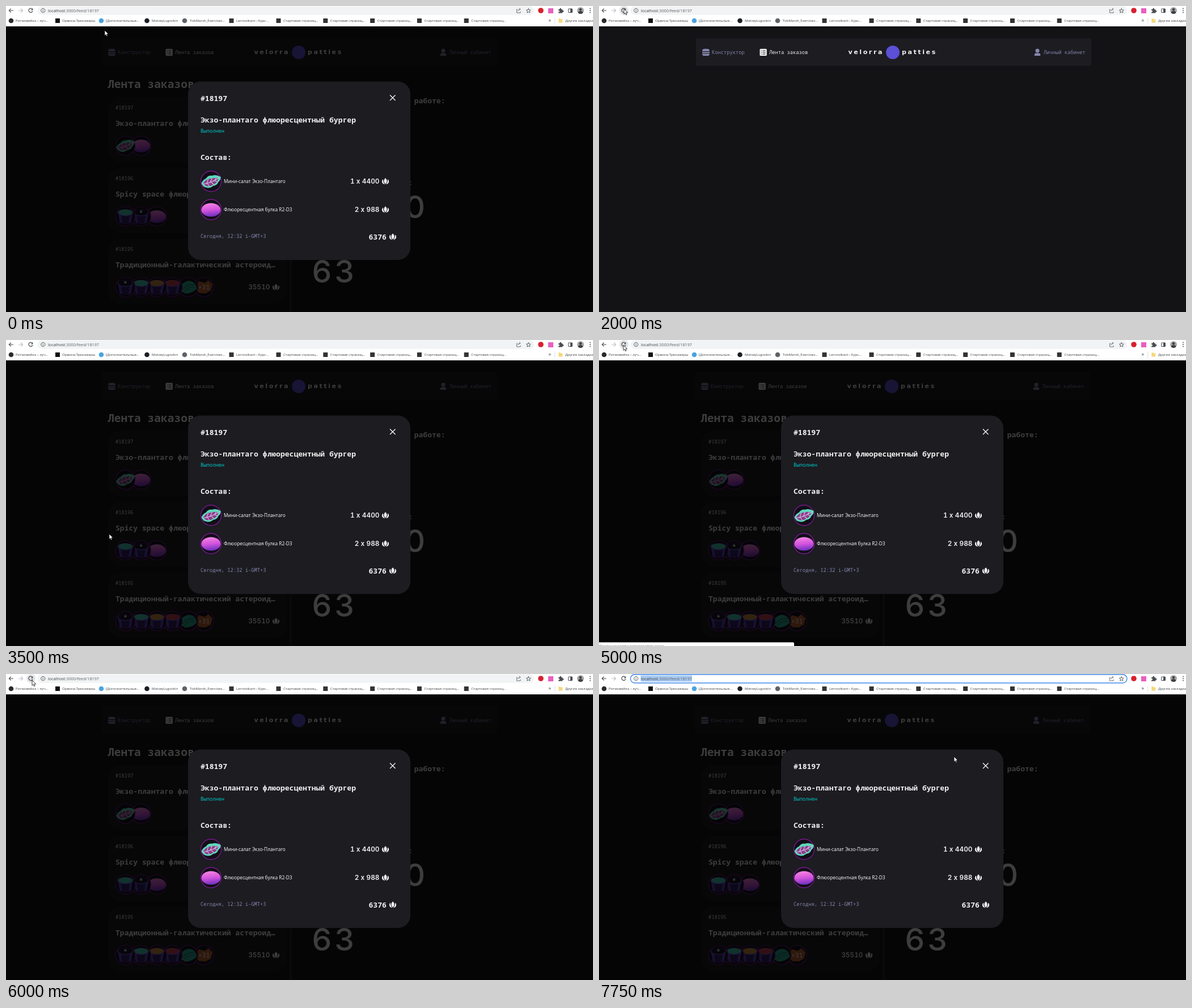
These frames come from a looping animation (1035 by 541 pixels, 8 s). An HTML page:

```html
<!DOCTYPE html>
<html lang="ru">
<head>
<meta charset="utf-8">
<title>Лента заказов</title>
<style>
  html, body { margin: 0; width: 100%; height: 100%; overflow: hidden; background: #131316; }
  svg { display: block; width: 1035px; height: 541px; }
  text { white-space: pre; }
  .ui { font: 6.15px "Open Sans", "Noto Sans", sans-serif; fill: #3c4043; }
  .url { font-size: 7.25px; }
  .mono { font-family: "Noto Sans Mono", "DejaVu Sans Mono", monospace; fill: #f2f2f3; }
  .s { font-size: 8.75px; }
  .m { font-size: 13.05px; font-weight: 600; }
  .l { font-size: 19.6px; font-weight: 600; }
  .muted { fill: #8585ad; }
  .item { font: 8.3px "Open Sans", "Noto Sans", sans-serif; fill: #fff; }
  .num { font: 600 11.7px Inter, sans-serif; font-variant-numeric: tabular-nums; letter-spacing: .1px; fill: #f2f2f3; text-anchor: end; }
  .big { font: 500 55px Inter, sans-serif; letter-spacing: 5px; fill: #f2f2f3; }
  .brand { font: bold 11px "DejaVu Sans", sans-serif; letter-spacing: 2.6px; fill: #f2f2f3; }
</style>
</head>
<body>
<svg id="stage" viewBox="0 0 1035 541" xmlns="http://www.w3.org/2000/svg"></svg>
<script>
const text = (x, y, cls, str, extra = '') => `<text x="${x}" y="${y}" class="${cls}" ${extra}>${str}</text>`;
const rect = (x, y, w, h, fill, r = 0, extra = '') =>
  `<rect x="${x}" y="${y}" width="${w}" height="${h}" rx="${r}" fill="${fill}" ${extra}/>`;
const dot = (x, y, r, fill, extra = '') => `<circle cx="${x}" cy="${y}" r="${r}" fill="${fill}" ${extra}/>`;
const line = (d, color, w = 1.2, extra = '') => `<path d="${d}" fill="none" stroke="${color}" stroke-width="${w}" ${extra}/>`;
const shape = (d, fill, extra = '') => `<path d="${d}" fill="${fill}" ${extra}/>`;
const at = (x, y, body, scale = 1) => `<g transform="translate(${x} ${y}) scale(${scale})">${body}</g>`;

const DARK = '#4a4d51';

// Ingredient pictures, drawn inside a circle of radius 18
const cup = top =>
  shape('M-14-7L-10.5 12Q0 17 10.5 12L14-7Z', '#5b3fc0') +
  shape('M-8-2L-6 14Q0 15.5 6 14L8-2Z', '#2f2068') +
  `<ellipse cy="-7" rx="14.5" ry="6.5" fill="#6a4fd0"/><ellipse cy="-7.6" rx="13" ry="5.6" fill="${top}"/>`;

const pictures = {
  leaf: shape('M-17 3Q-13-4-9-5Q-5-11 2-10Q8-13 17-8Q18-3 13 1Q11 7 4 8Q-2 13-8 11Q-15 10-17 3Z', '#5fd6bc') +
    shape('M-14 4Q-9-5 0-5Q7-7 13-5Q11 3 4 6Q-3 10-9 8Z', '#8c3d8c') +
    line('M-15 5Q0 3 14-6M-8 5L-5-4M-2 3L2-6M5 0L9-6M-6 4L-3 9M1 2L5 6M7-1L11 1', '#d3bfdc', 1.1),
  bun: '<ellipse cy=".5" rx="17" ry="12" fill="url(#bun)"/>',
  sauce: cup('#17131f') + dot(0, -9, 2.4, '#b9c0d8'),
  mint: cup('#45c6ae'),
  gold: cup('#c98a3a'),
  berry: cup('#c2404e'),
  teal: shape('M-16 6Q-14-10 2-12Q15-10 16 3Q6 13-6 12Z', '#2ba88f') +
    line('M-11 5Q0-7 12-4M-7 8Q2-2 13 1', '#176a62', 1.2),
  crust: shape('M-16 3L-10-11 2-8 8-13 16-5 13 7 3 12-9 11Z', '#b8602f') +
    text(0, 4, 'mono', '+31', 'font-size="12" text-anchor="middle"'),
};

const food = (kind, x, y, r = 17) => at(x, y,
  dot(0, 0, 18, '#100f16', 'stroke="#7c1690" stroke-width="1.3"') + pictures[kind], r / 18);

const side = 'M-3.9-3.4C-7.4-1.6-7 4.8-.8 5.4C-3.5 2.6-4.3-.2-3.9-3.4Z';
const gem = (x, y) => at(x, y,
  shape('M0-5.8C3.8-2.4 3.2 1.6 0 4.6C-3.2 1.6-3.8-2.4 0-5.8Z', '#f2f2f3') +
  shape(side, '#f2f2f3') + shape(side, '#f2f2f3', 'transform="scale(-1 1)"'));

const foods = (y, kinds) => kinds.map((k, i) => food(k, 210.5 + i * 27.7, y)).reverse().join('');

const card = (y, id, title, kinds) =>
  rect(180, y, 315, 115, '#1c1c21', 22) +
  text(193, y + 22, 'mono s', id) + text(193, y + 51, 'mono m', title) + foods(y + 86, kinds);

const header =
  rect(171, 57, 697, 48.5, '#1c1c21') +
  shape('M182 80Q182 75.8 186 75.8H191Q195 75.8 195 80ZM182 81.2H195V83.4H182ZM182 84.6H195Q195 88 192 88H185Q182 88 182 84.6Z', '#8585ad') +
  text(199, 85, 'mono s muted', 'Конструктор') +
  rect(283.5, 75.8, 12.3, 12.3, '#f2f2f3', 1.5) +
  line('M285.6 79H287M288.4 79H293.6M285.6 82H287M288.4 82H293.6M285.6 85H287M288.4 85H293.6', '#1c1c21', 1.2) +
  text(300, 85, 'mono s', 'Лента заказов') +
  text(439.5, 84.5, 'brand', 'velorra') + dot(518, 82, 12, '#5b50d6') + text(534, 84.5, 'brand', 'patties') +
  dot(773, 79, 3.5, '#8585ad') +
  shape('M767.8 88V86Q768 83.2 771 83.2H775Q778 83.2 778.2 86V88Z', '#8585ad') +
  text(784, 85, 'mono s muted', 'Личный кабинет');

const feed =
  text(179, 145, 'mono l', 'Лента заказов') +
  card(161, '#18197', 'Экзо-плантаго флюоресцентный бургер', ['leaf', 'bun']) +
  card(286, '#18196', 'Spicy space флюоресцентный бургер', ['mint', 'sauce', 'bun']) +
  card(411, '#18195', 'Традиционный-галактический астероид…', ['sauce', 'mint', 'gold', 'berry', 'teal', 'crust']) +
  text(465.5, 501, 'num', '35510') + gem(476, 497) +
  rect(500, 161, 4, 380, '#25252b') +
  text(704, 172, 'mono m', 'В работе:') +
  text(717, 317, 'mono m', 'Выполнено за все время:', 'text-anchor="end"') +
  text(744, 375, 'big', '0', 'text-anchor="end"') +
  text(539.5, 488.5, 'big', '63');

const modal =
  rect(321, 133.5, 392, 315.5, '#1c1c21', 22) +
  text(343, 167.5, 'mono m', '#18197') +
  line('M677 157.5L686.5 167M686.5 157.5L677 167', '#fff', 1.3) +
  text(343, 206, 'mono m', 'Экзо-плантаго флюоресцентный бургер') +
  text(343, 223.7, 'mono s', 'Выполнен', 'style="fill:#00cccc"') +
  text(343, 272, 'mono m', 'Состав:') +
  food('leaf', 361.5, 310, 18) + text(384, 313, 'item', 'Мини-салат Экзо-Плантаго') +
  text(658.5, 314, 'num', '1 x 4400') + gem(669, 310) +
  food('bun', 361.5, 360, 18) + text(384, 363, 'item', 'Флюоресцентная булка R2-D3') +
  text(658.5, 364, 'num', '2 x 988') + gem(669, 360) +
  text(343, 410, 'mono s muted', 'Сегодня, 12:32 i-GMT+3') +
  text(639.5, 412.5, 'mono m', '6376') + gem(682, 408);

const bookmarks = [
  [9, 17, '#2b2b2e', 'Ритмовейка – луч...'],
  [91, 99, '#111', 'Орвина.Тренажеры', true],
  [168, 176, '#4aa3e0', '[Дополнительные...'],
  [248.5, 257, '#1b1f23', 'MatveyLugovkin'],
  [315, 324, '#5f6368', 'TobMarsh_Exercises...'],
  [397.5, 406, '#333', 'Lernovikant ‹ Курс...', true],
  ...[0, 1, 2, 3, 4].map(i => [480.5 + i * 82.8, 489 + i * 82.8, '#333', 'Стартовая страниц...', true]),
];
const bookmark = ([ix, tx, color, name, square]) =>
  (square ? rect(ix - 4, 22, 8, 8, color) : dot(ix, 26, 4.3, color)) + text(tx, 28.2, 'ui', name);

const toolbar =
  rect(0, 0, 1035, 36, '#fff') +
  `<rect id="pill" x="55.5" y=".8" width="875.5" height="15" rx="7.5" fill="#f1f3f4" stroke-width="1.2"/>` +
  line('M13 8H5.4M8.8 4.6L5.4 8L8.8 11.4', DARK) +
  line('M22 8H29.6M26.2 4.6L29.6 8L26.2 11.4', '#bdc1c6') +
  dot(44, 8, 8, '#e4e5e7', 'id="hover"') +
  `<g id="reload">${line('M46.4 5.4A3.6 3.6 0 1 0 47 9', DARK) + shape('M47.4 3.8V7.4H43.8Z', DARK)}</g>` +
  line('M40.6 5L46.6 11M46.6 5L40.6 11', DARK, 1.2, 'id="stop"') +
  line('M65.3 4.4A3.6 3.6 0 1 0 65.31 4.4M65.3 7.5V10M65.3 5.8V6.7', DARK, .9) +
  rect(73.5, 2.6, 90.5, 11, '#a9cbf3', 0, 'id="selection"') +
  text(74, 10.7, 'ui url', 'localhost<tspan fill="#5f6368">:3000/feed/18197</tspan>') +
  line('M902 6H900.6V12H907V9.6M902.6 9Q903 5.6 906.8 5.6M905 3.8L907 5.6L905 7.6', DARK, .8) +
  line('M921.3 4.3L922.4 7 925.2 7.2 923.1 9.1 923.8 11.9 921.3 10.4 918.8 11.9 919.5 9.1 917.4 7.2 920.2 7Z', DARK, .9) +
  dot(943, 8, 4.8, '#d8202f') +
  rect(956, 4, 9, 9, '#e95fc0') +
  shape('M974 6H976.2A1.6 1.6 0 1 1 979.2 6H981.2V8A1.5 1.5 0 1 1 981.2 10.6V12.4H974V10.5A1.4 1.4 0 1 0 974 8Z', DARK) +
  rect(991.6, 4.9, 6.8, 6.6, 'none', .5, `stroke="${DARK}" stroke-width="1"`) + rect(995, 5, 3.4, 6.4, DARK) +
  dot(1013, 8, 6, '#a3a5a7') + dot(1013, 6.3, 2.2, '#3e4144') +
  shape('M1008.6 12Q1009.4 8.8 1013 8.8T1017.4 12A6 6 0 0 1 1008.6 12Z', '#3e4144') +
  [4.5, 8, 11.5].map(y => dot(1030, y, .9, DARK)).join('') +
  bookmarks.map(bookmark).join('') +
  text(956.5, 28.4, 'ui', '»', 'style="font-size:9px"') +
  rect(967.5, 21, .7, 10, '#cfd2d6') +
  shape('M974.3 22.3H977.4L978.4 23.4H981.3V29.6H974.3Z', '#f5d77c') +
  text(986, 28.2, 'ui', 'Другие закладки');

const status =
  shape('M0 534.5H342Q344 534.5 344 536.5V541H0Z', '#fff') +
  text(0, 542.6, 'ui', 'Ожидание norma.nomoreparties.space...');

document.getElementById('stage').innerHTML =
  `<defs><linearGradient id="bun" x1=".4" y1="0" x2=".55" y2="1">
    <stop offset="0" stop-color="#f584e4"/><stop offset=".5" stop-color="#d354dc"/><stop offset="1" stop-color="#6a2fc0"/>
  </linearGradient></defs>` +
  rect(0, 0, 1035, 541, '#131316') +
  `<g id="header">${header}</g>` +
  `<g id="order">${feed + rect(0, 36, 1035, 505, '#000', 0, 'opacity=".75"') + modal}</g>` +
  toolbar +
  `<g id="status">${status}</g>` +
  `<g id="arrow">${shape('M0 0V9.4L2.1 7.4 3.6 10.7 5.1 10 3.7 6.8H6.7Z', '#fff', 'stroke="#111" stroke-width=".8"')}</g>` +
  `<g id="beam">${line('M-1.6-4.5H1.6M0-4.5V4.5M-1.6 4.5H1.6', '#222', .8)}</g>`;

const el = {};
for (const id of ['pill', 'hover', 'reload', 'stop', 'selection', 'header', 'order', 'status', 'arrow', 'beam'])
  el[id] = document.getElementById(id);
const show = (id, on) => el[id].setAttribute('display', on ? 'inline' : 'none');

// Pointer moves: first tick, last tick, start, bend, end
const TICK = 250, LOOP = 8000;
const moves = [
  [0, 5, [174, 43], [90, 30], [44, 5]],
  [10, 14, [44, 5], [110, 150], [182, 343]],
  [14, 19, [182, 343], [70, 140], [43, 9]],
  [24, 28, [46, 11], [110, 14], [200, 8]],
  [31, 31, [626, 146], [626, 146], [626, 146]],
];

function pointer(tick) {
  const [from, to, a, b, c] = moves.filter(m => m[0] <= tick).pop();
  const p = to > from ? Math.min(1, (tick - from) / (to - from)) : 1;
  const e = p * p * (3 - 2 * p), q = 1 - e;
  return a.map((v, i) => q * q * v + 2 * q * e * b[i] + e * e * c[i]);
}

function draw(ms) {
  const tick = Math.floor((ms % LOOP) / TICK);
  const within = (from, to) => tick >= from && tick <= to;
  const empty = within(7, 9) || within(21, 23);
  const stopping = tick === 7 || tick === 21;
  const focused = tick >= 30;
  const [x, y] = pointer(tick);
  const overUrl = y < 16 && x > 56;

  show('order', !empty);
  el.header.setAttribute('transform', `translate(${empty ? 0 : -2} 0)`);
  show('status', tick === 6 || tick === 20);
  show('stop', stopping);
  show('reload', !stopping);
  show('hover', Math.hypot(x - 44, y - 8) < 9);
  show('selection', focused);
  el.pill.setAttribute('fill', focused ? '#fff' : '#f1f3f4');
  el.pill.setAttribute('stroke', focused ? '#1a73e8' : 'none');

  show('arrow', !overUrl);
  show('beam', overUrl);
  for (const id of ['arrow', 'beam']) el[id].setAttribute('transform', `translate(${x} ${y})`);
}

const start = performance.now();
function loop() {
  draw(performance.now() - start);
  requestAnimationFrame(loop);
}
loop();
</script>
</body>
</html>
```
